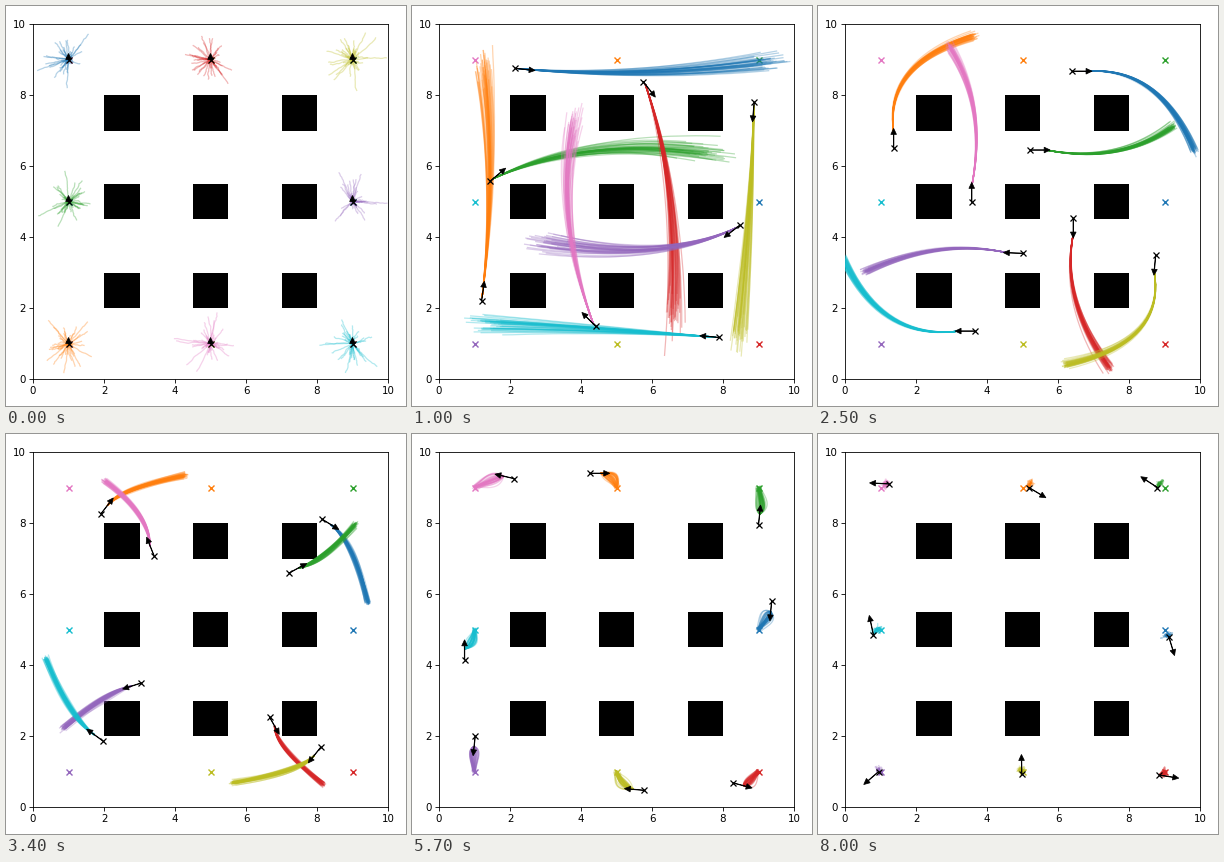
Animation of 400x400 px, one loop 8.1 s. Source, as a matplotlib script:

```python
import matplotlib.pyplot as plt
import numpy as np
from matplotlib.animation import FuncAnimation
from matplotlib.collections import LineCollection

FRAMES, INTERVAL = 81, 100
AGENTS, SAMPLES, STEPS = 8, 42, 22
KEYS = np.array([0, 10, 17, 25, 44, 57, 80])
S = np.linspace(0, 1, STEPS)[:, None]

# Noise for every frame and agent, drawn once so that each loop is identical
rng = np.random.default_rng(7)
SHIFTS = rng.normal(size=(FRAMES, AGENTS, 3, SAMPLES, 1, 1))
WALKS = rng.normal(size=(FRAMES, AGENTS, SAMPLES, STEPS, 2)).cumsum(axis=3) / np.sqrt(STEPS)

# Rollout statistics at the key times
END_SIDE = [.36, .13, .12, .055, .025, .03, .05]
END_ALONG = [.36, .32, .22, .07, .02, .03, .05]
BULGE = [0, 0, 0, .01, .06, .08, .06]
WIGGLE = [.05, .012, .01, .005, .003, .005, .02]
LEAD = [0, .1, .5, .45, .1, .3, 0]

plt.rcParams.update({"font.family": "DejaVu Sans", "font.size": 7.4})
fig = plt.figure(figsize=(4, 4), dpi=100, facecolor="white")
ax = fig.add_axes([27 / 400, 27 / 400, 355 / 400, 355 / 400])
ax.set(xlim=(0, 10), ylim=(0, 10), xticks=range(0, 11, 2), yticks=range(0, 11, 2))
ax.tick_params(width=.6, length=2.6, pad=2.8)
for spine in ax.spines.values():
    spine.set_linewidth(.6)
for x in (2, 4.5, 7):
    for y in (2, 4.5, 7):
        ax.add_patch(plt.Rectangle((x, y), 1, 1, color="black", lw=0))


def linear(values, t):
    values = np.asarray(values, float)
    if values.ndim == 1:
        return np.interp(t, KEYS, values)
    return np.array([np.interp(t, KEYS, column) for column in values.T])


def smooth(values, t):
    """Cubic Hermite interpolation that starts and ends at rest."""
    values = np.asarray(values, float)
    slopes = np.gradient(values, KEYS, axis=0)
    slopes[0] = slopes[-1] = 0
    i = min(np.searchsorted(KEYS, t, side="right") - 1, len(KEYS) - 2)
    h = KEYS[i + 1] - KEYS[i]
    u = (t - KEYS[i]) / h
    return ((1 + 2 * u) * (1 - u) ** 2 * values[i] + u * (1 - u) ** 2 * h * slopes[i]
            + u * u * (3 - 2 * u) * values[i + 1] + u * u * (u - 1) * h * slopes[i + 1])


class Agent:
    def __init__(self, color, goal, path, mids, ends, headings):
        self.path = path
        self.mids = [path[0]] + mids
        self.ends = [path[0]] + ends + [goal, mids[-1]]
        turns = np.unwrap(headings, period=360)
        self.headings = np.radians(np.r_[turns[0], turns])
        ax.plot(*goal, "x", color=color, ms=4.4, mew=1, zorder=2)
        self.fan = LineCollection([], colors=color, linewidths=.9, alpha=.33, zorder=3)
        ax.add_collection(self.fan)
        self.mark, = ax.plot([], [], "x", color="black", ms=4.4, mew=.9, zorder=5)
        self.arrow = ax.arrow(0, 0, 0, 0, width=.015, head_width=.16, head_length=.17,
                              color="black", lw=.5, zorder=6)

    def rollouts(self, t, pos, ahead, shifts, walk):
        t = 10 * np.sqrt(t / 10) if t < 10 else t
        start = pos + linear(LEAD, t) * ahead
        mid, end = linear(self.mids, t), linear(self.ends, t)
        control = 2 * mid - (start + end) / 2
        base = (1 - S) ** 2 * start + 2 * S * (1 - S) * control + S ** 2 * end

        along = end - mid + 1e-6 * ahead
        along /= np.hypot(*along)
        side = np.array([-along[1], along[0]])
        n_along, n_side, n_bulge = shifts
        growth = S ** 1.3
        return (base
                + growth * n_along * linear(END_ALONG, t) * along
                + growth * n_side * linear(END_SIDE, t) * side
                + np.sin(np.pi * S) * n_bulge * linear(BULGE, t) * side
                + S * walk * linear(WIGGLE, t))

    def update(self, t, shifts, walk):
        pos = smooth(self.path, t)
        angle = linear(self.headings, t)
        ahead = np.array([np.cos(angle), np.sin(angle)])
        self.fan.set_segments(list(self.rollouts(t, pos, ahead, shifts, walk)))
        self.mark.set_data([pos[0]], [pos[1]])
        dx, dy = .39 * ahead if t else (0, 0)
        self.arrow.set_data(x=pos[0], y=pos[1], dx=dx, dy=dy)


blue = Agent(
    "tab:blue", (9, 5),
    [(1, 9), (2.15, 8.75), (4.15, 8.6), (6.4, 8.67), (9.2, 7.1), (9.37, 5.8), (9.12, 4.8)],
    [(5.7, 8.65), (7.4, 8.7), (8.6, 8.17), (9.38, 6.08), (9.27, 5.35), (9.08, 4.84)],
    [(9.3, 8.95), (9.7, 7.83), (9.83, 6.42), (9, 5)],
    [-6, 0, 0, -67, -95, -73])
orange = Agent(
    "tab:orange", (5, 9),
    [(1, 1), (1.2, 2.2), (1.39, 4.17), (1.37, 6.5), (2.9, 9.3), (4.25, 9.4), (5.18, 9)],
    [(1.43, 5.6), (1.42, 7.2), (1.8, 8.6), (3.97, 9.32), (4.85, 9.3), (5.2, 9.08)],
    [(1.27, 8.8), (2.05, 9.9), (3.63, 9.66), (5, 9)],
    [82, 90, 90, 10, 0, -31])
green = Agent(
    "tab:green", (9, 9),
    [(1, 5), (1.45, 5.58), (2.95, 6.28), (5.22, 6.45), (8.63, 6.92), (9, 7.95), (8.8, 9)],
    [(4.3, 6.42), (6, 6.28), (7.6, 6.42), (8.9, 7.9), (9.07, 8.5), (8.86, 9.1)],
    [(7.6, 6.37), (9.55, 5.92), (9.24, 7.13), (8.9, 8.92)],
    [40, 8, 0, 60, 84, 147])
red = Agent(
    "tab:red", (9, 1),
    [(5, 9), (5.75, 8.38), (6.37, 6.77), (6.43, 4.53), (7.17, 1.1), (8.28, .68), (8.85, .9)],
    [(6.48, 5.3), (6.42, 3.75), (6.5, 2.2), (7.9, .88), (8.75, .72), (9, .95)],
    [(6.58, 1.9), (6.53, 1.1), (7.45, .32), (9, 1)],
    [-52, -78, -90, -28, -15, -9])
purple = Agent(
    "tab:purple", (1, 1),
    [(9, 5), (8.47, 4.33), (7.08, 3.73), (5.02, 3.54), (1.55, 3.25), (1.02, 2), (.95, 1)],
    [(6, 3.66), (3.9, 3.8), (2.6, 3.63), (1.18, 2.35), (.98, 1.5), (.97, 1.03)],
    [(2.95, 3.85), (1.05, 4.15), (.57, 3.02), (1.15, 1.32)],
    [-142, -171, 178, -140, -96, -139])
pink = Agent(
    "tab:pink", (1, 9),
    [(5, 1), (4.42, 1.48), (3.8, 2.85), (3.57, 4.98), (3.1, 8.72), (2.12, 9.25), (1.25, 9.1)],
    [(3.66, 4.45), (3.65, 5.85), (3.63, 7.55), (2.2, 9.08), (1.5, 9.22), (1.15, 9.1)],
    [(3.8, 7.2), (3.83, 9.1), (2.93, 9.38), (1, 9)],
    [135, 102, 90, 136, 167, 177])
olive = Agent(
    "tab:olive", (5, 1),
    [(9, 9), (8.88, 7.8), (8.8, 5.88), (8.75, 3.48), (7.05, .62), (5.78, .47), (4.98, .92)],
    [(8.72, 4.6), (8.73, 2.85), (8.25, 1.35), (5.95, .67), (5.2, .68), (4.98, 1.05)],
    [(8.42, 1.2), (7.75, .08), (6.2, .4), (5, 1)],
    [-95, -90, -95, -166, 175, 91])
cyan = Agent(
    "tab:cyan", (1, 5),
    [(9, 1), (7.9, 1.17), (5.98, 1.3), (3.66, 1.35), (.97, 2.78), (.72, 4.15), (.8, 4.85)],
    [(4.6, 1.38), (2.9, 1.47), (1.3, 1.72), (.73, 4.03), (.92, 4.65), (.92, 5)],
    [(1.35, 1.52), (.25, 2.35), (-.05, 3.4), (.82, 5.07)],
    [175, 178, 180, 104, 90, 102])
agents = [blue, orange, green, red, purple, pink, olive, cyan]


def update(frame):
    for agent, shifts, walk in zip(agents, SHIFTS[frame], WALKS[frame]):
        agent.update(frame, shifts, walk)
    return []


anim = FuncAnimation(fig, update, frames=FRAMES, interval=INTERVAL,
                     init_func=lambda: [], repeat=True, repeat_delay=0)
plt.show()
```
